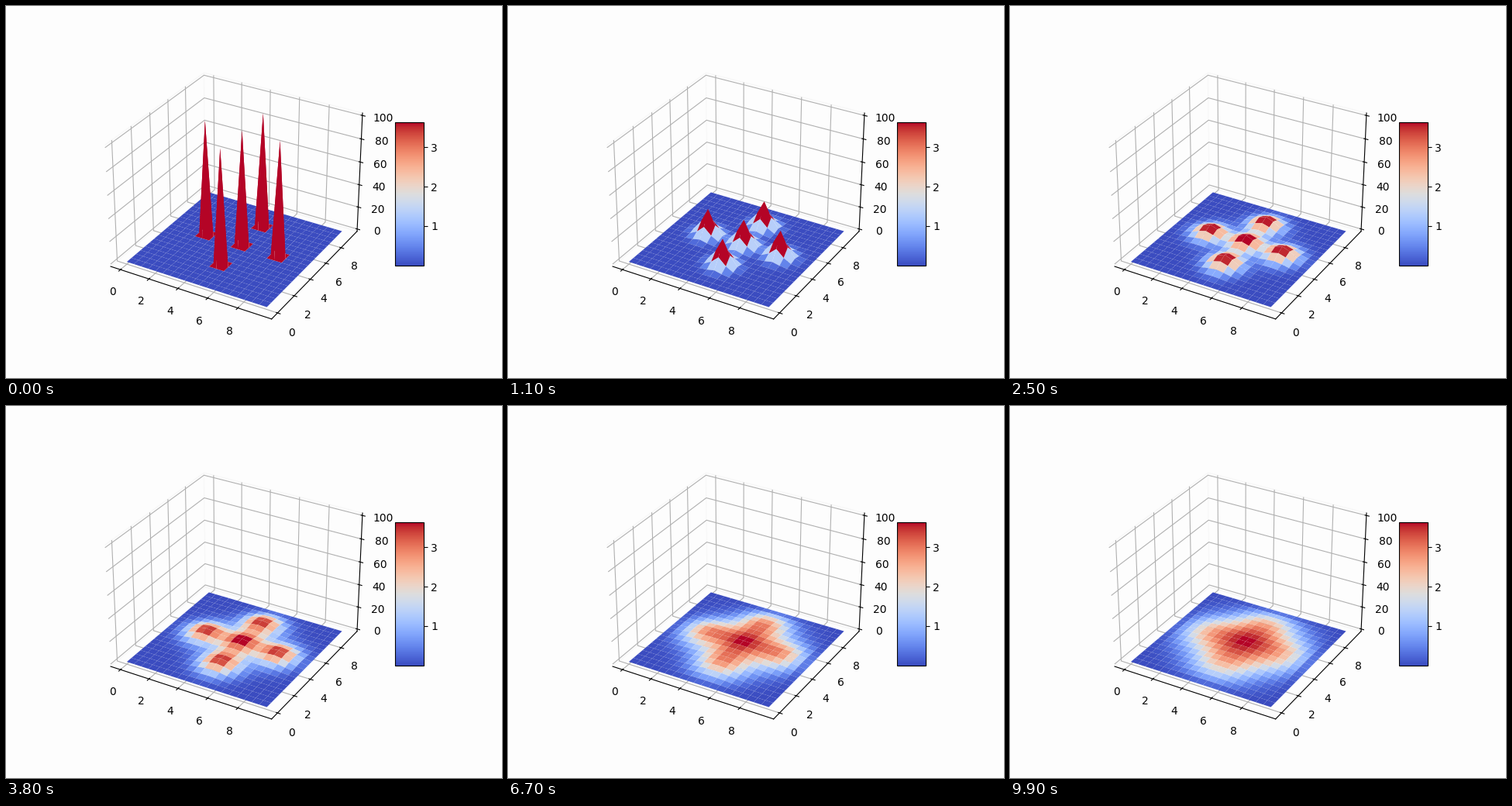
These frames come from a looping animation (640x480 px, 10 s). A matplotlib script:

```python
import matplotlib.pyplot as plt
import numpy as np
from matplotlib.animation import FuncAnimation

FRAMES = 100
INTERVAL = 100
RATE = 0.04  # diffusivity * dt / dx**2
PAPER = "#fdfdfd"

grid = np.arange(0, 10, 0.5)
X, Y = np.meshgrid(grid, grid)


def diffuse(u):
    """One explicit heat step; the border stays cold."""
    v = u.copy()
    v[1:-1, 1:-1] += RATE * (
        u[2:, 1:-1] + u[:-2, 1:-1] + u[1:-1, 2:] + u[1:-1, :-2]
        - 4 * u[1:-1, 1:-1]
    )
    return v


def padded(lo, hi):
    pad = (hi - lo) / 48
    return lo - pad, hi + pad


heat = np.zeros_like(X)
for row, col in [(10, 10), (5, 10), (15, 10), (10, 5), (10, 15)]:
    heat[row, col] = 100

states = [heat]
while len(states) < FRAMES:
    states.append(diffuse(states[-1]))

fig = plt.figure(figsize=(6.4, 4.8), dpi=100, facecolor=PAPER)
ax = fig.add_subplot(projection="3d", facecolor=PAPER)

side = padded(-0.475, 9.975)
ax.set(xlim=side, ylim=side, zlim=padded(0, 100),
       xticks=range(0, 10, 2), yticks=range(0, 10, 2),
       zticks=range(0, 101, 20))
for axis in (ax.xaxis, ax.yaxis, ax.zaxis):
    axis.pane.set_facecolor(PAPER)
    axis.pane.set_edgecolor("#f2f2f2")


def surface(i):
    return ax.plot_surface(X, Y, states[i], cmap="coolwarm", linewidth=0)


current = surface(FRAMES - 1)
fig.colorbar(current, ax=ax, shrink=0.5, aspect=5)


def update(i):
    global current
    current.remove()
    current = surface(i)
    return [current]


anim = FuncAnimation(fig, update, frames=FRAMES, interval=INTERVAL,
                     repeat=True, repeat_delay=0, blit=False)
plt.show()
```
